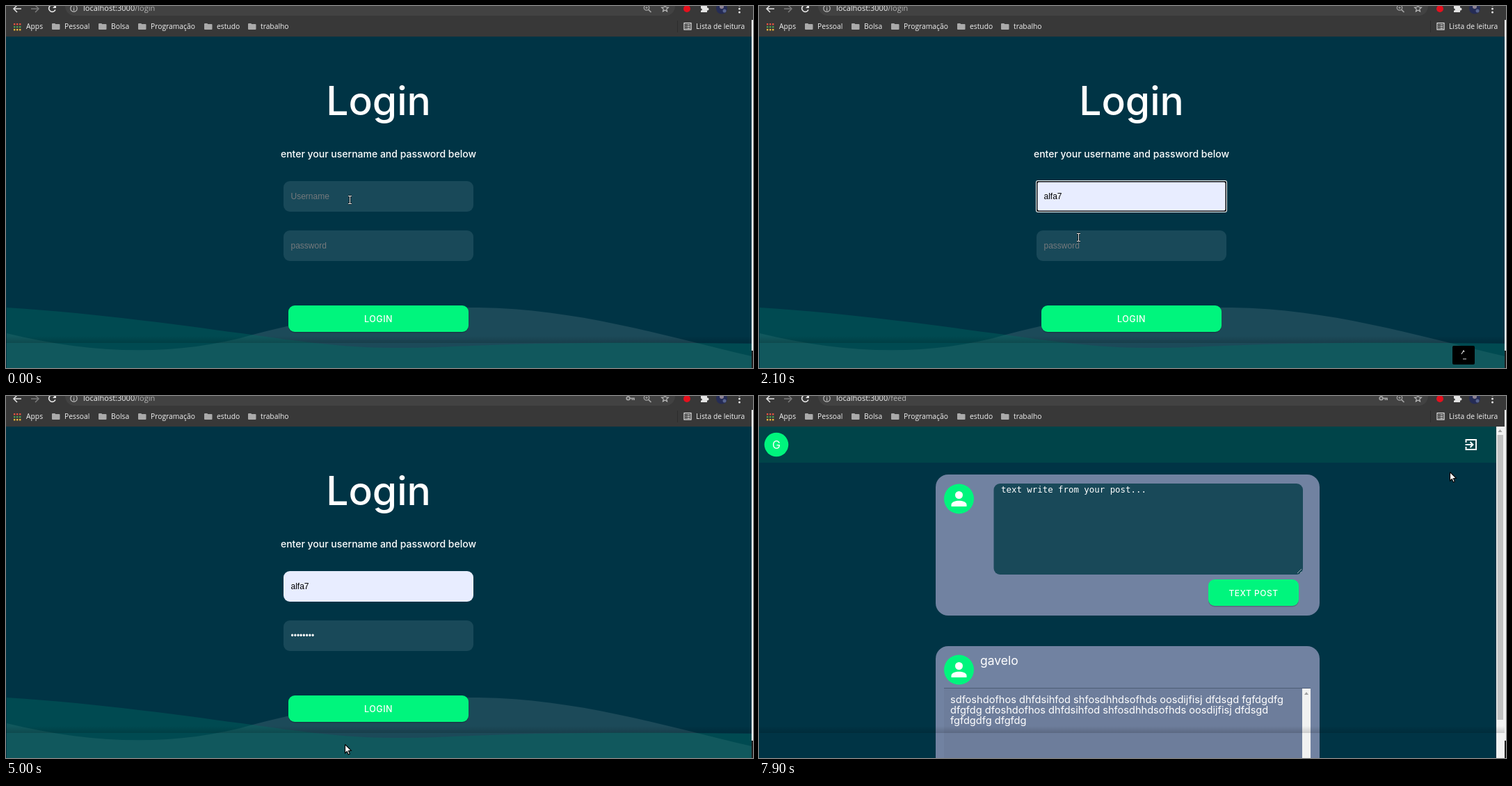
Recreate the animation shown at these times as an HTML page with a canvas. Size 1074x521 px, loop 8 s.

```html
<!DOCTYPE html>
<html lang="en">
<head>
<meta charset="utf-8">
<title>Login demo</title>
<style>
  html, body { margin: 0; width: 100%; height: 100%; overflow: hidden; background: #003445; }
  canvas { display: block; }
</style>
</head>
<body>
<canvas id="stage" width="1074" height="521"></canvas>
<script>
const ctx = document.getElementById('stage').getContext('2d');
const W = 1074, H = 521, PAGE_RIGHT = 1072, LOOP = 8000;
const BG = '#003445', GREEN = '#00f57d', GLASS = '#194959', CARD = '#7182a1';
const UI = '"Open Sans", sans-serif', PAGE = 'Inter, sans-serif', FIELD = '"Liberation Sans", Arial, sans-serif';
const USER = 'alfa7';
const SUGGESTIONS = [USER, 'gaveloMirtas', '000.111.222-33', '11112222333344', 'lunaviola_b', '55500011122'];

// Pointer path: start, end, x, y, shape. Moves advance in 100 ms steps.
const POINTER = [
  [0, 0, 494, 279, 'beam'],
  [800, 1100, 486, 300, 'beam'],
  [1100, 1500, 459, 319, 'arrow'],
  [1700, 1900, 459, 325, 'arrow'],
  [1900, 2200, 459, 337, 'beam'],
  [3800, 3800, 472, 429, 'arrow'],
  [4000, 4000, 482, 449, 'hand'],
  [4200, 4200, 485, 455, 'hand'],
  [4400, 4400, 486, 457, 'hand'],
  [4600, 4600, 488, 494, 'arrow'],
  [4900, 5000, 487, 501, 'arrow'],
  [6000, 6000, 592, 459, 'arrow'],
  [6300, 6300, 594, 457, 'arrow'],
  [7500, 7500, 977, 158, 'arrow'],
  [7700, 7700, 1000, 100, 'arrow'],
  [7900, 7900, 993, 109, 'arrow']
];
const HOVER = [[0, 0], [4000, 0.7], [4200, 1], [4600, 0.5], [4900, 0.15], [5000, 0]];

function rect(x, y, w, h, color) {
  ctx.fillStyle = color;
  ctx.fillRect(x, y, w, h);
}
function round(x, y, w, h, r, color) {
  ctx.beginPath();
  ctx.roundRect(x, y, w, h, r);
  ctx.fillStyle = color;
  ctx.fill();
}
function disc(x, y, r, color) {
  ctx.beginPath();
  ctx.arc(x, y, r, 0, 7);
  ctx.fillStyle = color;
  ctx.fill();
}
function ring(x, y, r, color, width = 1.3) {
  ctx.beginPath();
  ctx.arc(x, y, r, 0, 7);
  ctx.strokeStyle = color;
  ctx.lineWidth = width;
  ctx.stroke();
}
function line(points, color, width = 1.5) {
  ctx.beginPath();
  points.forEach(([x, y]) => ctx.lineTo(x, y));
  ctx.strokeStyle = color;
  ctx.lineWidth = width;
  ctx.stroke();
}
function poly(points, color) {
  ctx.beginPath();
  points.forEach(([x, y]) => ctx.lineTo(x, y));
  ctx.closePath();
  ctx.fillStyle = color;
  ctx.fill();
}
function text(str, x, y, font, color, align = 'left', spacing = 0) {
  ctx.font = font;
  ctx.fillStyle = color;
  ctx.textAlign = align;
  ctx.letterSpacing = spacing + 'px';
  ctx.fillText(str, x, y);
  const width = ctx.measureText(str).width;
  ctx.letterSpacing = '0px';
  return width;
}

function drawToolbar(t) {
  const icon = '#e4e4e4', dim = '#a3a3a3';
  rect(0, 0, W, 44, '#383838');
  round(85, -14, 877, 28, 14, '#424242');
  line([[22, 4], [11, 4]], icon);
  line([[16, -1], [11, 4], [16, 9]], icon);
  line([[36, 4], [47, 4]], '#7c7c7c');
  line([[42, -1], [47, 4], [42, 9]], '#7c7c7c');
  ctx.beginPath();
  ctx.arc(66.5, 3.5, 4.8, 0.4, 5.6);
  ctx.strokeStyle = icon;
  ctx.lineWidth = 1.7;
  ctx.stroke();
  poly([[72, -2], [72, 3], [67, 3]], icon);

  ring(97.5, 3.5, 4.7, '#bdbdbd', 1.2);
  rect(97, 3, 1.2, 3.5, '#bdbdbd');
  rect(97, 1, 1.2, 1.2, '#bdbdbd');
  const host = text('localhost:3000', 111, 7, '11px ' + UI, '#eeeeee');
  text(t < 6300 ? '/login' : '/feed', 111 + host, 7, '11px ' + UI, '#b4b4b4');

  if (t >= 3400) {
    ring(894.5, 3.3, 2.3, dim, 1.8);
    line([[897, 3.3], [903, 3.3], [903, 6]], dim, 1.8);
    line([[900.5, 3.3], [900.5, 6]], dim);
  }
  ring(921, 2.5, 3.7, dim);
  line([[923.8, 5.3], [927.5, 9]], dim, 1.7);
  line([[919.2, 2.5], [922.8, 2.5]], dim, 1);
  line([[921, 0.7], [921, 4.3]], dim, 1);
  const star = [...Array(11)].map((_, i) => {
    const r = i % 2 ? 2.3 : 5.2, a = -Math.PI / 2 + i * Math.PI / 5;
    return [947.5 + r * Math.cos(a), 3.7 + r * Math.sin(a)];
  });
  line(star, '#c4c4c4', 1.1);
  disc(979, 4, 5, '#e5101d');
  rect(999, 0, 9, 9, icon);
  disc(1003.5, -0.5, 2, icon);
  disc(1008.5, 4.5, 2, icon);
  disc(999.2, 5, 1.6, '#383838');
  disc(1029, 3.5, 8, '#252c55');
  disc(1029, 1, 3, '#8d8291');
  disc(1033, 7, 2.5, '#59658f');
  [-1, 4, 9].forEach(y => disc(1054.5, y, 1.5, icon));

  const dots = ['#e15241', '#4f9d55', '#e8b43c'];
  for (let i = 0; i < 9; i++) {
    const row = Math.floor(i / 3);
    rect(11 + i % 3 * 4, 25 + row * 4, 2.4, 2.4, dots[row]);
  }
  const label = (str, x) => text(str, x, 33, '10.3px ' + UI, '#f2f2f2');
  label('Apps', 29);
  [['Pessoal', 84], ['Bolsa', 151], ['Programação', 208], ['estudo', 303], ['trabalho', 366]].forEach(([name, x]) => {
    round(x - 18, 25, 5, 4, 1, '#aaaaaa');
    round(x - 18, 26, 11.5, 8, 1, '#aaaaaa');
    label(name, x);
  });
  rect(965, 21, 1, 17, '#2c2c2c');
  ctx.strokeStyle = icon;
  ctx.lineWidth = 1.2;
  ctx.strokeRect(975, 24.5, 10, 9.5);
  [27, 29.5, 32].forEach(y => {
    rect(977, y - 0.5, 1.2, 1.2, icon);
    rect(979.3, y - 0.5, 4, 1.2, icon);
  });
  label('Lista de leitura', 992);
}

function drawWaves() {
  const close = color => {
    ctx.lineTo(PAGE_RIGHT, H);
    ctx.lineTo(1, H);
    ctx.closePath();
    ctx.fillStyle = color;
    ctx.fill();
  };
  ctx.beginPath();
  ctx.moveTo(1, 471);
  ctx.bezierCurveTo(120, 500, 240, 506, 355, 473);
  ctx.bezierCurveTo(450, 447, 560, 433, 680, 434);
  ctx.bezierCurveTo(820, 436, 940, 473, PAGE_RIGHT, 504);
  close('#1c4a59');
  ctx.beginPath();
  ctx.moveTo(1, 434);
  ctx.bezierCurveTo(140, 443, 255, 460, 360, 474);
  ctx.bezierCurveTo(460, 488, 520, 495, 620, 491);
  ctx.bezierCurveTo(760, 484, 900, 483, PAGE_RIGHT, 486);
  close('rgba(0,108,98,0.4)');
}

function drawEdges() {
  const shade = ctx.createLinearGradient(0, 475, 0, 485);
  shade.addColorStop(0, 'rgba(0,0,0,0)');
  shade.addColorStop(1, 'rgba(0,0,0,0.16)');
  rect(0, 475, PAGE_RIGHT, 10, shade);
  rect(PAGE_RIGHT, 496, 2, 25, '#1d1d1d');
}

function drawField(y, focused, fill) {
  if (!focused) return round(399, y, 273, 44, 9, fill);
  round(398, y - 1, 275, 46, 3, '#ffffff');
  round(399, y, 273, 44, 2, '#0a0f12');
  round(400.5, y + 1.5, 270, 41, 2, fill);
}

function drawButton(x, y, w, h, color, label, font) {
  round(x, y + 1.5, w, h, 9, 'rgba(0,0,0,0.2)');
  round(x, y, w, h, 9, color);
  text(label, x + w / 2, y + 24, font, '#ffffff', 'center', 0.5);
}

function drawDropdown(hovered) {
  rect(399, 298, 273, 182, '#373737');
  if (hovered) rect(399, 304, 273, 28, '#83b175');
  SUGGESTIONS.forEach((name, i) =>
    text(name, 408, 322 + i * 28.2, '600 10.8px ' + UI, i || !hovered ? '#e2e2e2' : '#ffffff'));
}

function drawLogin(t) {
  const hovered = t >= 1300, open = t >= 500 && t < 1800, sent = t >= 5400;
  const hasUser = hovered && !sent;
  drawWaves();
  text('Login', 535.5, 157, '500 57px ' + PAGE, '#ffffff', 'center');
  text('enter your username and password below', 535.5, 218, '500 14px ' + PAGE, '#ffffff', 'center');

  drawField(252, t >= 500 && t < 3100, hasUser ? '#e8edff' : GLASS);
  text(hasUser ? USER : 'Username', 409.5, 278, '12px ' + FIELD, hasUser ? '#000000' : '#75797c');
  if (t >= 2200 && t < 3100) rect(435, 267, 1, 13, '#000000');

  const onPassword = t >= 3100 && t < 4400;
  const dots = sent || t < 3400 ? 0 : t < 3500 ? 5 : 8;
  drawField(323, onPassword, GLASS);
  if (dots) text('•'.repeat(dots), 409.5, 349, '12px ' + FIELD, '#ffffff');
  else text('password', 409.5, 349, '12px ' + FIELD, '#75797c');
  if (onPassword && t < 4200) rect(409.5 + dots * 4.2, 338, 1, 14, '#ffffff');

  if (sent) text('loading...', 535.5, 399, '500 14px ' + PAGE, '#008a0c', 'center');
  drawEdges();
  const hover = HOVER.filter(([at]) => at <= t).pop()[1];
  drawButton(406, 431, 259, 38, `rgb(0,${245 - 37 * hover},${125 - 15 * hover})`, 'LOGIN', '500 12.5px ' + PAGE);
  if (open) drawDropdown(hovered);
  if (t >= 1000 && t < 2200) {
    round(997, 489, 32, 27, 2, '#000000');
    line([[1010, 501], [1013, 496], [1014, 498]], '#d8d8d8', 1.2);
    line([[1012, 508], [1017, 508]], '#d8d8d8', 1);
  }
}

function drawAvatar(x, y) {
  disc(x, y, 21.5, GREEN);
  disc(x, y - 5.5, 5.5, '#ffffff');
  ctx.beginPath();
  ctx.moveTo(x - 11, y + 11);
  ctx.lineTo(x - 11, y + 8);
  ctx.bezierCurveTo(x - 10, y + 1, x + 10, y + 1, x + 11, y + 8);
  ctx.lineTo(x + 11, y + 11);
  ctx.fill();
}

function drawFeed() {
  rect(0, 44, 1060, 52, '#004449');
  disc(25, 70, 17.3, GREEN);
  text('G', 25, 75.5, '16px ' + PAGE, '#ffffff', 'center');
  line([[1016.5, 67], [1016.5, 63], [1031, 63], [1031, 77], [1016.5, 77], [1016.5, 73]], '#ffffff', 1.9);
  line([[1015.5, 70], [1026, 70]], '#ffffff', 1.9);
  line([[1022.5, 66], [1026.5, 70], [1022.5, 74]], '#ffffff', 1.9);

  round(254, 113, 552, 203, 18, CARD);
  drawAvatar(287.5, 148);
  round(337.5, 126, 444.5, 131, 9, GLASS);
  text('text write from your post...', 348, 139, '12.4px "DejaVu Sans Mono", monospace', '#ffffff');
  line([[774, 255], [780, 249]], '#9aabb2', 1);
  line([[778, 255], [780, 253]], '#9aabb2', 1);
  drawButton(646, 264, 130, 38, GREEN, 'TEXT POST', '500 12px ' + PAGE);

  round(254, 360, 552, 200, 18, CARD);
  drawAvatar(287.5, 394);
  text('gavelo', 318, 387, '17.5px ' + PAGE, '#ffffff');
  rect(266, 420, 515, 101, '#6d7d9b');
  rect(266, 420, 527, 1, '#4e5d76');
  rect(781, 421, 12, 100, '#f1f1f1');
  poly([[784, 430], [790, 430], [787, 426]], '#a0a0a0');
  [
    'sdfoshdofhos dhfdsihfod shfosdhhdsofhds oosdijfisj dfdsgd fgfdgdfg',
    'dfgfdg dfoshdofhos dhfdsihfod shfosdhhdsofhds oosdijfisj dfdsgd',
    'fgfdgdfg dfgfdg'
  ].forEach((row, i) => text(row, 275, 442 + i * 15, '14.6px ' + PAGE, '#ffffff'));

  rect(1060, 44, PAGE_RIGHT - 1060, 477, '#f1f1f1');
  poly([[1062.5, 52], [1068.5, 52], [1065.5, 48]], '#a0a0a0');
  rect(1061.5, 56, 8.5, 410, '#c1c1c1');
  drawEdges();
}

function pointerAt(t) {
  const q = Math.floor(t / 100) * 100;
  let [, , x, y, shape] = POINTER[0];
  for (const [start, end, toX, toY, kind] of POINTER) {
    if (q < start) break;
    const p = end > start ? Math.min(1, (q - start) / (end - start)) : 1;
    x += (toX - x) * p;
    y += (toY - y) * p;
    shape = kind;
  }
  return { x: Math.round(x), y: Math.round(y), shape };
}

function drawPointer(t) {
  const { x, y, shape } = pointerAt(t);
  ctx.save();
  ctx.translate(x, y);
  if (shape === 'beam') {
    const beam = (color, width) => {
      line([[0.5, -5], [0.5, 5]], color, width);
      line([[-2, -5.5], [3, -5.5]], color, width);
      line([[-2, 5.5], [3, 5.5]], color, width);
    };
    beam('#0a0a0a', 2.2);
    beam('#ffffff', 0.9);
  } else if (shape === 'hand') {
    round(-3, 5, 11, 9, 3, '#000000');
    round(-1, -1, 4, 12, 2, '#000000');
    round(-2, 6, 9, 7, 2, '#ffffff');
    round(0, 0, 2, 10, 1, '#ffffff');
  } else {
    const outline = [[0.5, 0.5], [0.5, 13], [3.3, 10.5], [5.2, 15], [7.3, 14], [5.4, 9.8], [9.3, 9.4]];
    poly(outline, '#ffffff');
    line([...outline, outline[0]], '#000000', 1.1);
  }
  ctx.restore();
}

function draw(t) {
  rect(0, 0, W, H, BG);
  if (t < 6600) drawLogin(t);
  else drawFeed();
  drawToolbar(t);
  rect(PAGE_RIGHT, 20, 2, 476, '#f2f2f2');
  drawPointer(t);
}

const began = performance.now();
function tick() {
  draw((performance.now() - began) % LOOP);
  requestAnimationFrame(tick);
}
tick();
</script>
</body>
</html>
```
